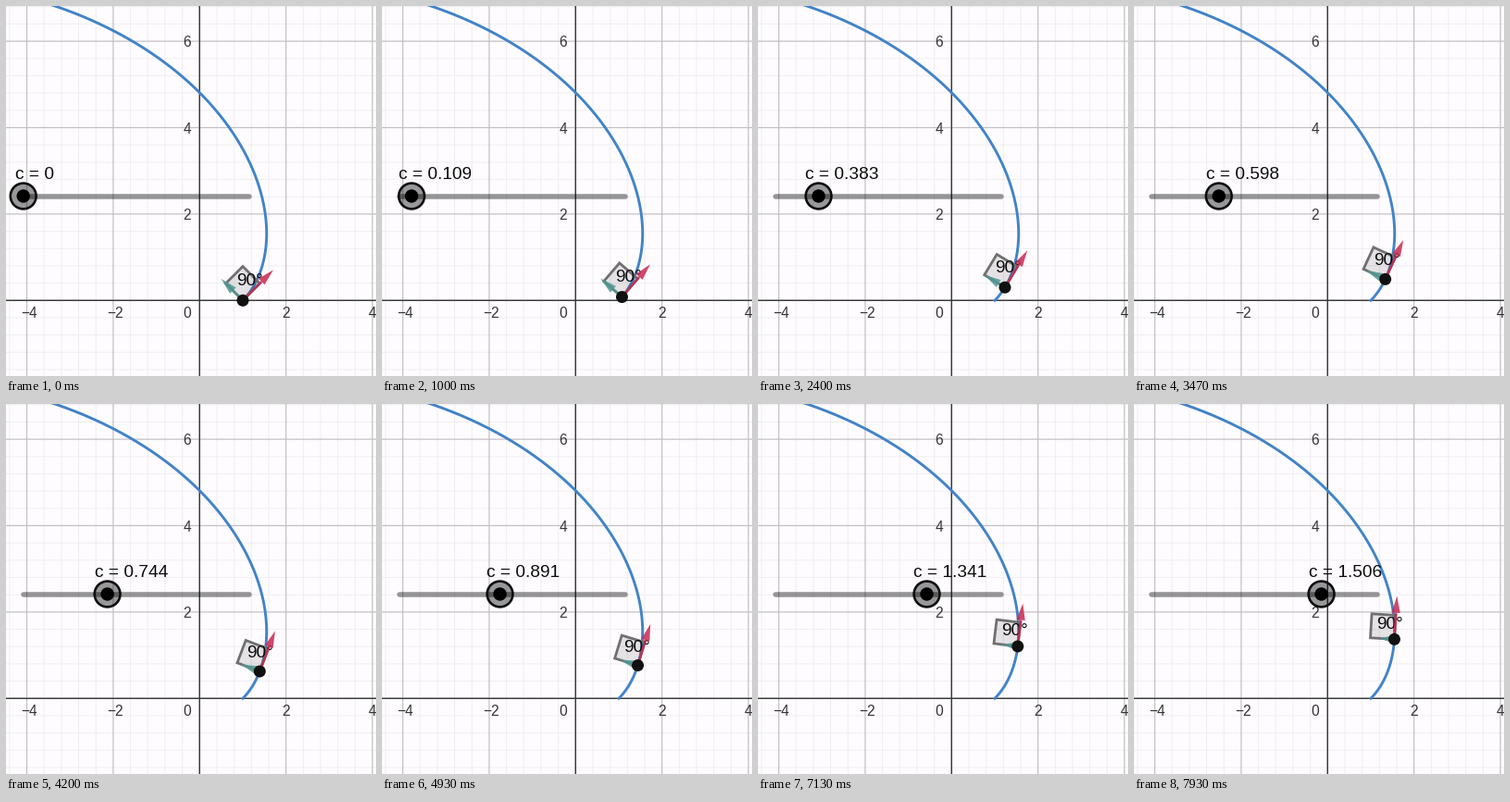
Recreate the animation shown at these times as a matplotlib script. Size 400 px wide and 400 px high, loop 8000 ms.

```python
import numpy as np
import matplotlib.pyplot as plt
from matplotlib.animation import FuncAnimation
from matplotlib.patches import Circle, Polygon

SIZE, DPI = 400, 100
PX = 72 / DPI                     # points per pixel
OX, OY, UNIT = 209.3, 318.3, 46.7  # origin and scale on the stage
FRAMES, LOOP_MS = 121, 8000
TRACK_X, TRACK_Y, TRACK_STEP, C_MAX = 18.7, 205.5, 122.1, 2
BOX = 26
RED, TEAL, INK = "#c8284f", "#4f9692", "#0c0c0c"
SHADE = (0, 0, 0, 0.4)

plt.rcParams["font.family"] = "Liberation Sans"
fig = plt.figure(figsize=(SIZE / DPI, SIZE / DPI), dpi=DPI, facecolor="#fefcff")
ax = fig.add_axes([0, 0, 1, 1])
ax.set_xlim(0, SIZE)
ax.set_ylim(SIZE, 0)
ax.axis("off")


def stage(x, y):
    return np.array([OX + UNIT * x, OY - UNIT * y])


def label(x, y, s, size, z, ha="left", color=INK):
    return ax.text(x, y, s, fontsize=size * PX, ha=ha, va="baseline",
                   color=color, zorder=z)


def cross(value, color, width, z):
    style = dict(color=color, lw=width * PX, zorder=z, snap=False)
    ax.axvline(OX + value * UNIT, **style)
    ax.axhline(OY - value * UNIT, **style)


def draw_grid():
    for k in range(-12, 22):
        if k % 5:
            cross(0.4 * k, "#f1eef1", 1, 0)
        else:
            cross(0.4 * k, "#c1bfc2", 1.2, 1)
    cross(0, "#363636", 1.4, 2)
    for n in (-4, -2, 2, 4):
        text = str(n).replace("-", "\u2212")
        shift = 2.4 if n < 0 else 0
        label(OX + n * UNIT + shift, 337.3, text, 15.5, 2, "center", "#333333")
    for n in (2, 4, 6):
        label(200.2, OY - n * UNIT + 6, str(n), 15.5, 2, "right", "#333333")
    label(199.5, 337.3, "0", 15.5, 2, "right", "#333333")


class Arrow:
    HEAD, HALF = 18, 4.6

    def __init__(self, color, z):
        self.shaft, = ax.plot([], [], color=color, lw=2.6 * PX, alpha=0.85,
                              solid_capstyle="butt", zorder=z)
        self.head = Polygon(np.zeros((3, 2)), fc=color, ec="none",
                            alpha=0.85, zorder=z)
        ax.add_patch(self.head)

    def place(self, start, direction, length):
        tip = start + direction * length
        base = tip - direction * min(self.HEAD, length)
        side = self.HALF * np.array([-direction[1], direction[0]])
        self.shaft.set_data(*zip(start, base))
        self.head.set_xy([tip, base + side, base - side])


def heading(angle):
    return np.array([np.cos(angle), -np.sin(angle)])


draw_grid()

# logarithmic spiral r = e^t
t = np.linspace(0, 2.4, 400)
ax.plot(*stage(np.exp(t) * np.cos(t), np.exp(t) * np.sin(t)),
        color="#4183c8", lw=2.9 * PX, zorder=3)

square = Polygon(np.zeros((4, 2)), fc=(0, 0, 0, 0.1), ec="#707070",
                 lw=2.8 * PX, joinstyle="miter", zorder=4)
ax.add_patch(square)
angle_text = label(0, 0, "90°", 19.2, 5)
normal = Arrow(TEAL, 6)
tangent = Arrow(RED, 7)
dot = Circle((0, 0), 6.5, fc="#101010", ec="none", zorder=8)
ax.add_patch(dot)

# translucent track and knob, so the axis and the track show through
ax.plot([TRACK_X, TRACK_X + TRACK_STEP * C_MAX], [TRACK_Y] * 2, color=SHADE,
        lw=5.6 * PX, solid_capstyle="round", zorder=9)
knob = Circle((0, 0), 13.9, fc=SHADE, ec=INK, lw=2.6 * PX, zorder=10)
core = Circle((0, 0), 7.2, fc="black", ec="none", zorder=11)
ax.add_patch(knob)
ax.add_patch(core)
value_text = label(0, 187, "", 19.2, 12)

KEY_FRAMES = [0, 6.65, 15, 36, 52, 74, 94, 119]
KEY_VALUES = [0, 0, 0.109, 0.383, 0.598, 0.891, 1.163, 1.506]


def update(i):
    c = np.interp(i, KEY_FRAMES, KEY_VALUES)

    # point at arc length c, with its unit tangent and curvature vector
    r = 1 + c / np.sqrt(2)
    a = np.log(r)
    p = stage(r * np.cos(a), r * np.sin(a))
    tan, nor = heading(a + np.pi / 4), heading(a + 3 * np.pi / 4)
    dot.center = p
    tangent.place(p, tan, UNIT)
    normal.place(p, nor, UNIT / (np.sqrt(2) + c))
    square.set_xy([p, p + BOX * tan, p + BOX * (tan + nor), p + BOX * nor])
    angle_text.set_position(p + 19 * heading(a + np.pi / 2) + (-6.4, 2.5))

    x = TRACK_X + TRACK_STEP * c
    knob.center = core.center = (x, TRACK_Y)
    value_text.set_position((max(9.5, x - 14), 187))
    value_text.set_text(f"c = {round(c, 3):g}")
    return ()


anim = FuncAnimation(fig, update, frames=FRAMES, interval=LOOP_MS / FRAMES,
                     init_func=lambda: update(0), repeat=True, repeat_delay=0,
                     blit=False)
plt.show()
```
